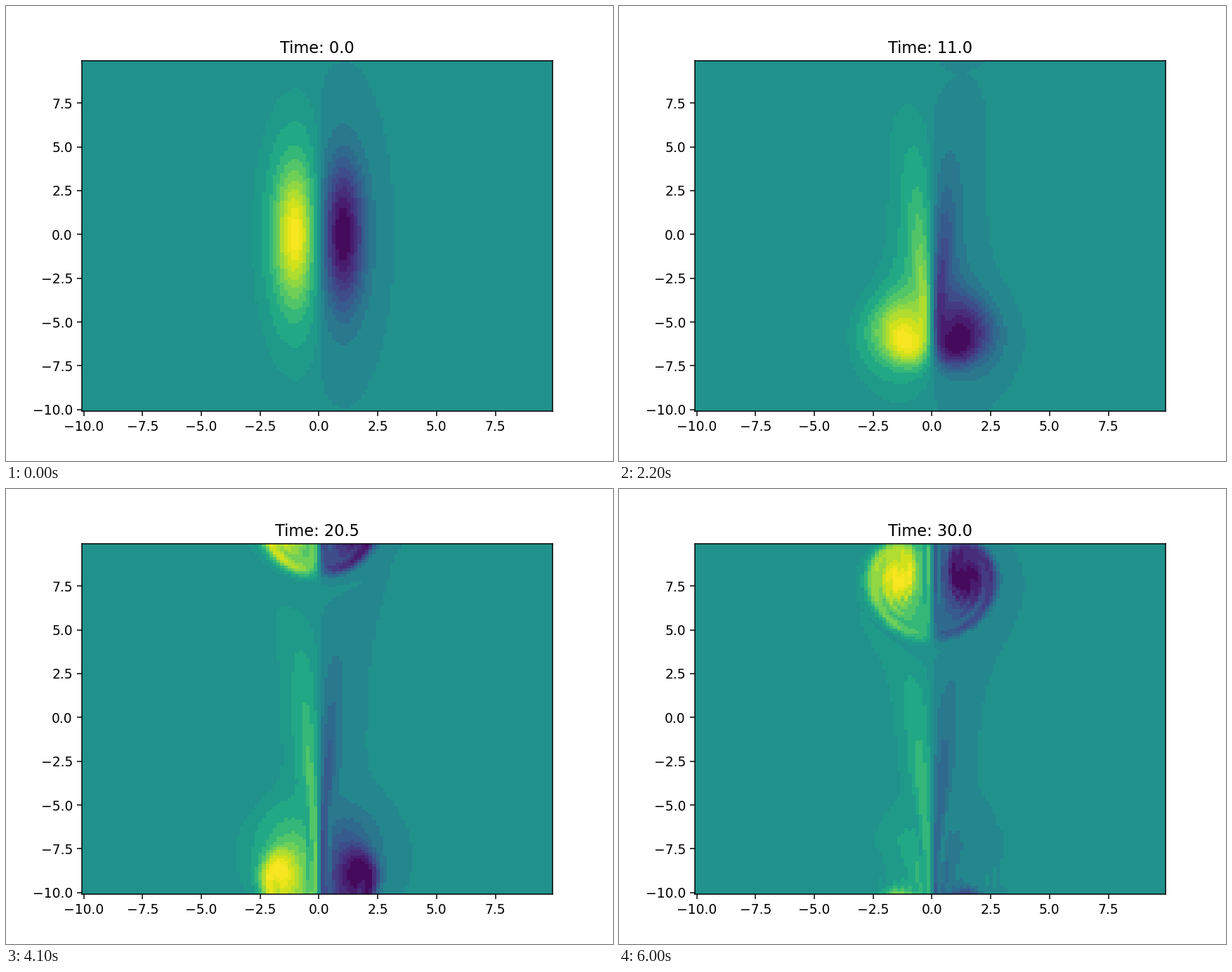
A matplotlib script that plays this animation: 864 by 648 pixels, repeating every 6100 ms.

```python
import numpy as np
import matplotlib.pyplot as plt
from matplotlib.animation import FuncAnimation
from matplotlib.colors import BoundaryNorm, ListedColormap

N = 128
SIZE = 20.0
H = SIZE / N
NU = 0.001
FRAMES = 61
FRAME_DT = 0.5
SUBSTEPS = 5

axis = -SIZE / 2 + H * np.arange(N)
X, Y = np.meshgrid(axis, axis)

# Inverse Laplacian on the periodic square
k = 2 * np.pi * np.fft.fftfreq(N, H)
kr = 2 * np.pi * np.fft.rfftfreq(N, H)
K2 = k[:, None] ** 2 + kr[None, :] ** 2
K2[0, 0] = 1.0


def diff(f, ax):
    return (np.roll(f, -1, ax) - np.roll(f, 1, ax)) / (2 * H)


def laplacian(f):
    around = sum(np.roll(f, s, ax) for s in (-1, 1) for ax in (0, 1))
    return (around - 4 * f) / H**2


def rate(w):
    spectrum = np.fft.rfft2(w) / K2
    spectrum[0, 0] = 0
    psi = np.fft.irfft2(spectrum, s=w.shape)
    advection = diff(psi, 1) * diff(w, 0) - diff(psi, 0) * diff(w, 1)
    return NU * laplacian(w) - advection


def rk4(w, dt):
    a = rate(w)
    b = rate(w + dt / 2 * a)
    c = rate(w + dt / 2 * b)
    d = rate(w + dt * c)
    return w + dt / 6 * (a + 2 * b + 2 * c + d)


def blob(x0):
    return np.exp(-((X - x0) ** 2) - Y**2 / 20)


def simulate():
    w = blob(-1) - blob(1)
    fields = [w]
    for _ in range(FRAMES - 1):
        for _ in range(SUBSTEPS):
            w = rk4(w, FRAME_DT / SUBSTEPS)
        fields.append(w)
    return [f / np.abs(f).max() for f in fields]


# Colour bands, finer towards the bright end
low = [-1, -0.9, -0.8, -0.7, -0.6, -0.49, -0.38, -0.272, -0.137, -0.0074]
high = [0.032, 0.125, 0.272, 0.397, 0.52, 0.62, 0.71, 0.81, 0.9, 0.96, 1]
edges = np.array(low + high)
mids = (edges[1:] + edges[:-1]) / 2
mids[len(low) - 1] = 0
bands = ListedColormap(plt.get_cmap("viridis")((mids + 1) / 2))
bands.set_under(bands(0))
bands.set_over(bands(len(mids) - 1))

fields = simulate()
fig, ax = plt.subplots(figsize=(6.4, 4.8), dpi=135)
mesh = ax.pcolormesh(X, Y, fields[0], shading="nearest", cmap=bands,
                     norm=BoundaryNorm(edges, len(mids)))
title = ax.set_title("Time: 0.0")


def draw(i):
    mesh.set_array(fields[i])
    title.set_text(f"Time: {i * FRAME_DT:.1f}")
    return mesh, title


anim = FuncAnimation(fig, draw, frames=FRAMES, interval=100, repeat=True,
                     repeat_delay=0)
plt.show()
```
